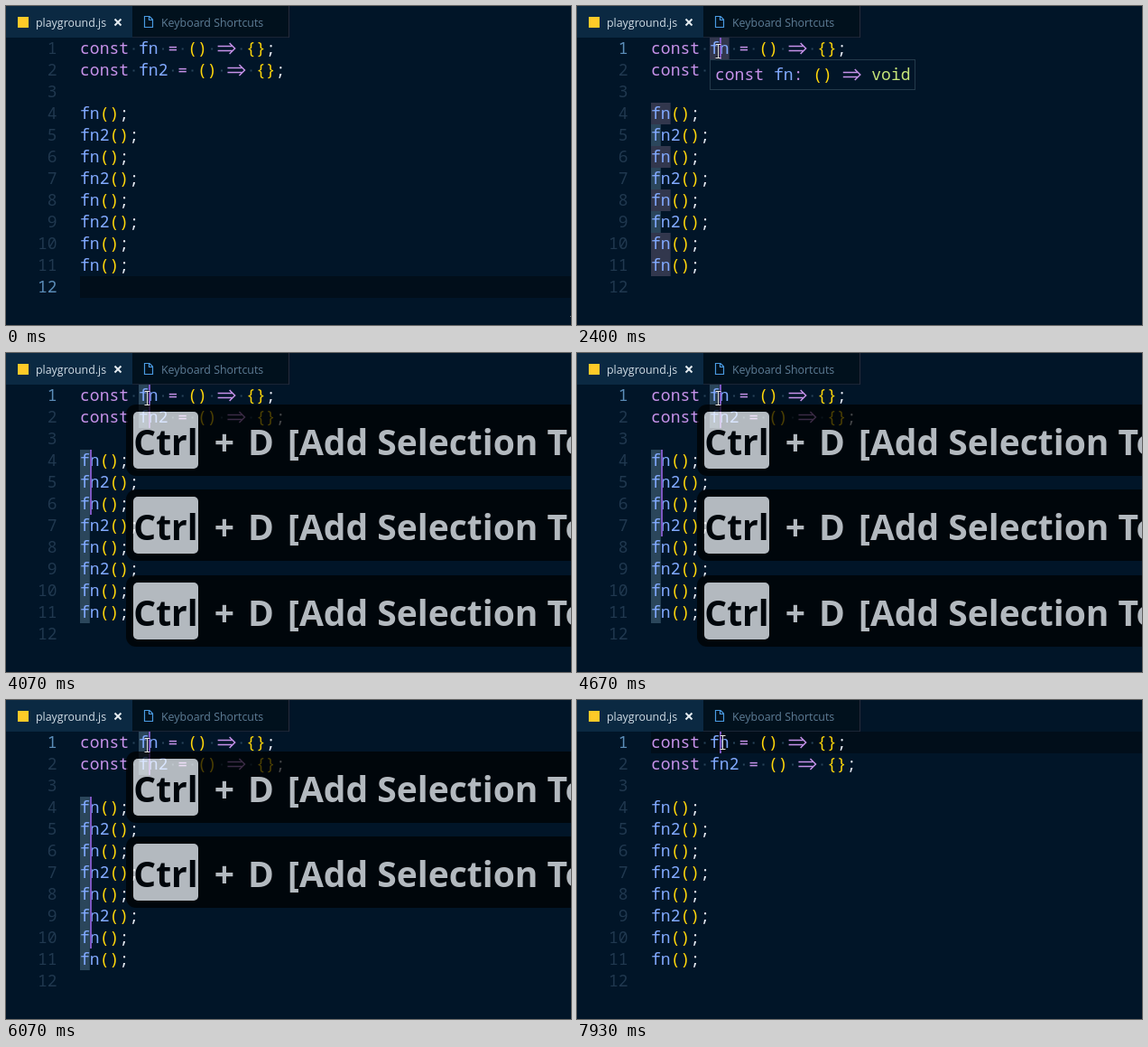
An HTML page with a canvas for the animation above (8000 ms loop, 626 px wide and 353 px high).

```html
<!DOCTYPE html>
<html>
<head>
<meta charset="utf-8">
<style>
  html, body { margin: 0; width: 100%; height: 100%; overflow: hidden; background: #011528; }
  canvas { display: block; width: 626px; height: 353px; }
</style>
</head>
<body>
<canvas id="stage" width="626" height="353"></canvas>
<script>
const stage = document.getElementById('stage').getContext('2d');
const layer = document.createElement('canvas');
layer.width = 626;
layer.height = 353;
let ctx = stage;

const LOOP = 8000, TICK = 1000 / 15;
const LEFT = 82, TOP = 35, ROW = 24, CHAR = 10.83;
const MONO = '500 18px "Noto Sans Mono", "DejaVu Sans Mono", monospace';
const SANS = '"Open Sans", "Noto Sans", sans-serif';
const PURPLE = '#c792ea', BLUE = '#82aaff', GOLD = '#ffd70a', PALE = '#e4e9f2';

// Ticks of the key presses, and how long each caption stays.
const PRESSES = [40, 47, 55, 61, 67, 73, 81, 87];
const CAPTION_LIFE = 16, CAPTION_ALPHA = 0.7;
const CLICK = 14, SELECT = 18, MARK = 21, HOVER = 25, CLEAR = 107;

const names = ['fn', 'fn2', '', 'fn', 'fn2', 'fn', 'fn2', 'fn', 'fn2', 'fn', 'fn', ''];
const isDefinition = row => row < 2;
const colX = col => LEFT + col * CHAR;
const rowY = row => TOP + row * ROW;
const nameX = row => colX(isDefinition(row) ? 6 : 0);
const within = (k, from, to) => k >= from && k < to;

// Pointer way points: tick, x, y
const PATH = [
  [0, 628, 351], [1, 619, 340], [3, 480, 238], [5, 292, 112], [7, 186, 58], [8, 172, 51],
  [11, 172, 51], [12, 160, 50], [14, 148, 50], [16, 151, 50], [18, 156, 50],
  [110, 156, 50], [112, 147, 49], [113, 142, 48], [115, 156, 47], [116, 161, 47], [120, 161, 47]
];

function pointerAt(k) {
  let i = 0;
  while (i < PATH.length - 2 && PATH[i + 1][0] <= k) i++;
  const [t0, x0, y0] = PATH[i], [t1, x1, y1] = PATH[i + 1];
  const p = Math.min(1, (k - t0) / (t1 - t0));
  return [x0 + (x1 - x0) * p, y0 + (y1 - y0) * p];
}

function rect(x, y, w, h, color) {
  ctx.fillStyle = color;
  ctx.fillRect(x, y, w, h);
}

function roundRect(x, y, w, h, r, color) {
  ctx.beginPath();
  ctx.roundRect(x, y, w, h, r);
  ctx.fillStyle = color;
  ctx.fill();
}

function text(s, x, y, color, font, align = 'left') {
  ctx.font = font;
  ctx.textAlign = align;
  ctx.fillStyle = color;
  ctx.fillText(s, x, y);
}

function line(color, width, ...points) {
  ctx.beginPath();
  points.forEach(([x, y], i) => i ? ctx.lineTo(x, y) : ctx.moveTo(x, y));
  ctx.strokeStyle = color;
  ctx.lineWidth = width;
  ctx.stroke();
}

function code(s, col, row, color) {
  [...s].forEach((c, i) => text(c, colX(col + i), rowY(row) + 18, color, MONO));
}

function arrow(x, y, color) {
  line(color, 1.5, [x + 1, y - 2.5], [x + 17, y - 2.5]);
  line(color, 1.5, [x + 1, y + 2.5], [x + 17, y + 2.5]);
  line(color, 1.5, [x + 14, y - 6], [x + 20, y], [x + 14, y + 6]);
}

function drawTabs() {
  rect(0, 0, 140, 35, '#0b2942');
  rect(140, 0, 174, 35, '#01111d');
  rect(140, 34, 174, 1, '#1b2536');
  rect(313, 0, 1, 35, '#272b3b');
  rect(13, 12, 12, 12, '#ffca28');
  text('playground.js', 33, 23, '#d2dee7', '12.4px ' + SANS);
  line('#e4ebf0', 2, [120.5, 14.5], [127.5, 21.5]);
  line('#e4ebf0', 2, [127.5, 14.5], [120.5, 21.5]);
  const blue = '#4a9ae0';
  line(blue, 1.2, [159, 11.5], [153.5, 11.5], [153.5, 23.5], [162.5, 23.5], [162.5, 15], [159, 11.5]);
  line(blue, 1.2, [158.5, 11.5], [158.5, 15.5], [162.5, 15.5]);
  text('Keyboard Shortcuts', 172, 23, '#5f7e97', '12.4px ' + SANS);
}

function drawDefinition(row) {
  const name = names[row], end = 6 + name.length;
  code('const', 0, row, PURPLE);
  code(name, 6, row, BLUE);
  code('=', end + 1, row, PURPLE);
  code('()', end + 3, row, GOLD);
  arrow(colX(end + 6), rowY(row) + 12, PURPLE);
  code('{}', end + 9, row, GOLD);
  code(';', end + 11, row, PALE);
  for (const col of [5, end, end + 2, end + 5, end + 8]) {
    rect(colX(col) + 4.4, rowY(row) + 11.5, 2, 2, '#28445a');
  }
}

function drawCode(k) {
  const current = k < CLICK ? 11 : 0;
  names.forEach((name, row) => {
    const color = row === current ? '#5b8db8' : '#20384f';
    text(row + 1, 56.5, rowY(row) + 18, color, MONO, 'right');
    if (isDefinition(row)) drawDefinition(row);
    else if (name) {
      code(name, 0, row, BLUE);
      code('()', name.length, row, GOLD);
      code(';', name.length + 2, row, PALE);
    }
  });
}

function drawMarks(k) {
  const selecting = within(k, SELECT, CLEAR);
  if (!selecting) {
    rect(LEFT, rowY(k < CLICK ? 11 : 0), 626 - LEFT, ROW, '#010e1a');
    return;
  }
  names.forEach((name, row) => {
    if (!name || (k < MARK && row)) return;
    const x = nameX(row), y = rowY(row);
    rect(x, y, CHAR, ROW, '#2b465b');
    if (name === 'fn' && k >= MARK && k < PRESSES[0]) rect(x, y, 2 * CHAR, ROW, '#32374d');
  });
}

function drawCarets(k) {
  const hidden = k < CLICK || within(k, 26, 33) || within(k, 54, 55) ||
    within(k, 94, 102) || within(k, 115, 119);
  if (hidden) return;
  const added = k < CLEAR ? PRESSES.filter(p => p <= k).length : 0;
  const rows = names.map((n, row) => row).filter(row => names[row]).slice(0, added + 1);
  for (const row of rows) {
    const x = nameX(row) + (k < SELECT ? 0 : CHAR);
    rect(Math.round(x), rowY(row), 2, ROW, '#7e57c2');
  }
}

function drawHover(k) {
  if (!within(k, HOVER, PRESSES[0])) return;
  ctx.globalAlpha = k === HOVER ? 0.5 : 1;
  rect(147, 59, 228, 34, '#243b4c');
  rect(148, 60, 226, 32, '#011528');
  const put = (s, col, color) => text(s, 153 + col * CHAR, 82, color, MONO);
  put('const', 0, PURPLE);
  put('fn', 6, BLUE);
  put(':', 8, PURPLE);
  put('()', 10, GOLD);
  arrow(153 + 13 * CHAR, 76, PURPLE);
  put('void', 16, '#c5e478');
  ctx.globalAlpha = 1;
}

function drawCaption(slot, alpha) {
  const y = Math.round(57 + slot * 94.4), font = 'bold 39px ' + SANS;
  ctx.globalAlpha = alpha;
  roundRect(133, y, 520, 79, 11, '#000');
  roundRect(141, y + 8, 72, 63, 5, '#fff');
  text('Ctrl', 177, y + 56, '#000', font, 'center');
  text('+', 242, y + 56, '#fff', font, 'center');
  text('D', 268, y + 56, '#fff', font);
  text('[Add Selection To Next Find Match]', 312, y + 56, '#fff', font);
}

function drawCaptions(k) {
  // The oldest caption leaves and the rest move up, so only the last slot fades.
  const live = PRESSES.filter(p => within(k, p, p + CAPTION_LIFE + 1));
  const leaving = live.some(p => k === p + CAPTION_LIFE);
  // Captions are painted solid on a layer, so that the code shows evenly through them.
  ctx = layer.getContext('2d');
  ctx.clearRect(0, 0, 626, 353);
  live.forEach((p, slot) => drawCaption(slot, leaving && slot === live.length - 1 ? 0.5 : 1));
  ctx.globalAlpha = 1;
  ctx = stage;
  ctx.globalAlpha = CAPTION_ALPHA;
  ctx.drawImage(layer, 0, 0);
  ctx.globalAlpha = 1;
}

function drawPointer(k) {
  const [px, py] = pointerAt(k);
  const x = Math.round(px) + 0.5, y = Math.round(py);
  const shape = (color, width) => {
    line(color, width, [x, y - 7], [x, y + 7]);
    for (const end of [-7.5, 7.5]) line(color, width, [x - 3, y + end], [x + 3, y + end]);
  };
  shape('rgba(0, 0, 0, 0.5)', 2.4);
  shape('#e8e8e8', 1);
}

function draw(time) {
  const k = Math.floor((time % LOOP) / TICK + 0.1);
  rect(0, 0, 626, 353, '#011528');
  drawTabs();
  drawMarks(k);
  drawCode(k);
  drawCarets(k);
  drawHover(k);
  drawCaptions(k);
  drawPointer(k);
}

const start = performance.now();
function frame() {
  draw(performance.now() - start);
  requestAnimationFrame(frame);
}
frame();
</script>
</body>
</html>
```
